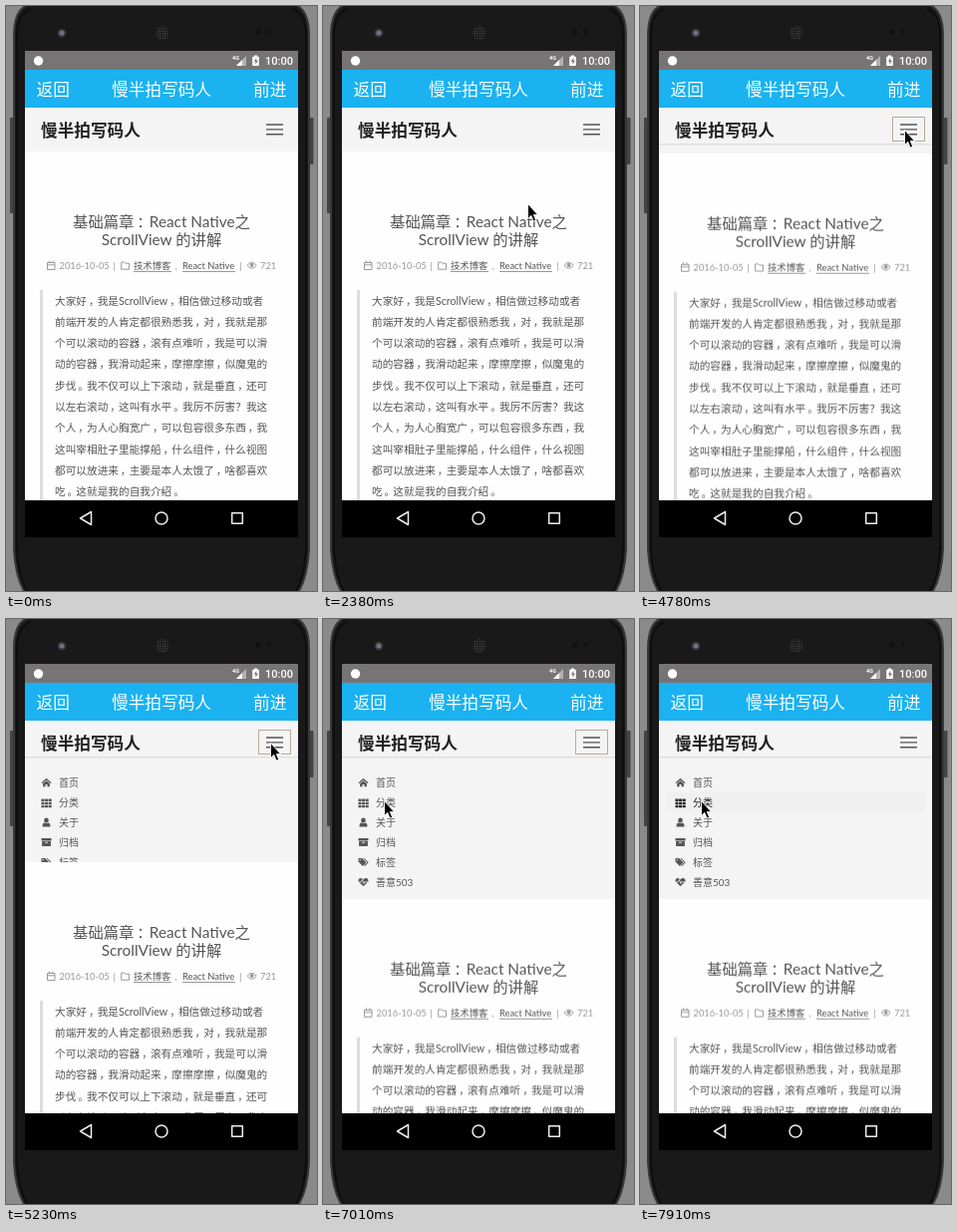
Write an HTML page that moves like this. It is 312 px wide and 587 px high and loops after 8000 ms.

```html
<!DOCTYPE html>
<html lang="zh-CN">
<head>
<meta charset="utf-8">
<title>ScrollView</title>
<style>
html, body { margin: 0; width: 100%; height: 100%; overflow: hidden; background: #8a8a8a; }
svg { display: block; }
text { font-family: Lato, "Noto Sans CJK SC", "Noto Sans CJK", "Noto Sans", sans-serif; white-space: pre; }
.ui { font-family: Roboto, "Noto Sans CJK SC", "Noto Sans CJK", sans-serif; }
.line { fill: none; stroke: #999; stroke-width: 1; }
</style>
</head>
<body>
<svg id="stage" width="312" height="587" viewBox="0 0 312 587">
  <defs>
    <clipPath id="web"><rect x="19" y="102" width="274" height="394"/></clipPath>
    <pattern id="mesh" width="2.4" height="2.4" patternUnits="userSpaceOnUse">
      <rect width="2.4" height="2.4" fill="#111"/><circle cx="1.2" cy="1.2" r=".75" fill="#555"/>
    </pattern>
  </defs>

  <!-- handset -->
  <rect width="312" height="587" fill="#8a8a8a"/>
  <rect x="4" y="112" width="4" height="96" rx="1" fill="#444"/>
  <rect x="305" y="112" width="3.5" height="47" rx="1" fill="#444"/>
  <path d="M24-3C13 2 8 11 8 30V545C9 565 13 580 20 590H292C299 580 303 565 304 545V30C304 11 299 2 288-3Z" fill="#191919" stroke="#383838" stroke-width="2"/>
  <path d="M24 3C15 7 11 15 11 31V544C12 564 16 580 23 590M288 3C297 7 301 15 301 31V544C300 564 296 580 289 590" fill="none" stroke="#0c0c0c" stroke-width="1.5"/>
  <circle cx="56" cy="27" r="4.5" fill="#333"/>
  <circle cx="56" cy="27" r="2.6" fill="#6d7284"/>
  <circle cx="157" cy="27" r="6.8" fill="url(#mesh)"/>
  <circle cx="253" cy="26" r="2.5" fill="#101010"/>
  <circle cx="264" cy="26" r="2" fill="#101010"/>

  <!-- status bar -->
  <rect x="19" y="45" width="274" height="19" fill="#767475"/>
  <circle cx="32.5" cy="55" r="4.7" fill="#fff"/>
  <path d="M241 50V60H231Z" fill="#fff" fill-opacity=".45"/>
  <path d="M237 54V60H231Z" fill="#fff"/>
  <path d="M249 49.5h3v1.3h1.8v9.2h-6.6v-9.2h1.8Z" fill="#fff"/>
  <path d="M251.3 51.8l-2.4 4h1.5v3l2.4-4h-1.5Z" fill="#767475"/>

  <!-- app bar -->
  <rect x="19" y="64" width="274" height="38" fill="#1ab2f0"/>

  <g clip-path="url(#web)">
    <rect x="19" y="102" width="274" height="394" fill="#f4f4f4"/>
    <rect id="row" x="26" y="174" width="260" height="20" fill="#f0f0f0" opacity="0"/>
    <g id="menu"></g>
    <g id="article">
      <rect x="19" y="146" width="274" height="360" fill="#fefefe"/>
      <rect x="34" y="285" width="3" height="260" fill="#ddd"/>
      <!-- calendar, folder, eye -->
      <path class="line" d="M41.5 257.5h7.5v7h-7.5ZM41.5 259.8h7.5M43.5 255.6v2.4M47 255.6v2.4"/>
      <path class="line" d="M115.7 257h3l1 1.2h3.8v6h-7.8Z"/>
      <path class="line" d="M242 260.3q4.6-6 9.2 0q-4.6 6-9.2 0Z"/>
      <circle cx="246.6" cy="260" r="1.9" fill="#999"/>
      <path class="line" d="M128 266.5h38M177 266.5h53"/>
    </g>
    <rect id="rule" x="19" y="138" width="274" height="1.3" fill="#ddd" opacity="0"/>
    <path d="M261 119h17M261 123.9h17M261 128.8h17" stroke="#555" stroke-width="1.4"/>
    <rect id="focus" x="253.5" y="111.5" width="32" height="24" fill="none" stroke="#b8ab9b" opacity="0"/>
  </g>

  <!-- navigation keys -->
  <rect x="19" y="496" width="274" height="37" fill="#000"/>
  <g fill="none" stroke="#eee" stroke-width="1.5" stroke-linejoin="round">
    <path d="M85.5 507.5V520.5L74.5 514Z"/>
    <circle cx="156" cy="514" r="6"/>
    <rect x="226.7" y="508.7" width="10.6" height="10.6"/>
  </g>

  <path id="cursor" d="M.5.5V15.5L3.8 12.4L6.2 18.2L8.7 17.1L6.3 11.5H10.6Z" fill="#000" stroke="#fff" stroke-width=".9" stroke-linejoin="round" opacity="0"/>
</svg>
<script>
const LOOP = 8000;
const NS = "http://www.w3.org/2000/svg";
const $ = id => document.getElementById(id);

function add(parent, tag, attrs, html = "") {
  const el = document.createElementNS(NS, tag);
  for (const key in attrs) el.setAttribute(key, attrs[key]);
  el.innerHTML = html;
  parent.append(el);
  return el;
}

// Full-width marks sit near the middle of their cell.
const centreMarks = s => s.replace(/([，。：])(.?)/g,
  '<tspan dx=".18em">$1</tspan><tspan dx="-.18em">$2</tspan>');

const label = (parent, x, y, size, fill, s, more) =>
  add(parent, "text", { x, y, "font-size": size, fill, ...more }, centreMarks(s));

const stage = $("stage"), article = $("article"), menu = $("menu");
const web = article.parentNode;
const SITE = "慢半拍写码人";
const ui = { class: "ui" };
const mid = { "text-anchor": "middle" };

function fixedText() {
  const top = add(stage, "g", {});
  label(top, 227, 54, 5.5, "#fff", "4G", { class: "ui", "font-weight": 700 });
  label(top, 260, 59, 11, "#fff", "10:00", { class: "ui", "font-weight": 500 });
  label(top, 30.5, 90, 16.67, "#fff", "返回", ui);
  label(top, 156, 90, 16.67, "#fff", SITE, { ...ui, ...mid });
  label(top, 248, 90, 16.67, "#fff", "前进", ui);
  label(web, 35, 130.5, 16.67, "#222", SITE, { "font-weight": 700 });
  stage.append($("cursor"));
}

function articleText() {
  label(article, 156, 222, 15.33, "#555", "基础篇章：React Native之", mid);
  label(article, 156, 240.4, 15.33, "#555", "ScrollView 的讲解", mid);
  [[53.5, "2016-10-05"], [107.5, "|"], [169.5, ","], [234.5, "|"], [255, "721"]]
    .forEach(([x, s]) => label(article, x, 263.6, 9.33, "#999", s));
  label(article, 128, 263.6, 9.33, "#555", "技术博客");
  label(article, 177, 263.6, 9.33, "#555", "React Native");
  [
    "大家好，我是ScrollView，相信做过移动或者",
    "前端开发的人肯定都很熟悉我，对，我就是那",
    "个可以滚动的容器，滚有点难听，我是可以滑",
    "动的容器，我滑动起来，摩擦摩擦，似魔鬼的",
    "步伐。我不仅可以上下滚动，就是垂直，还可",
    "以左右滚动，这叫有水平。我厉不厉害？我这",
    "个人，为人心胸宽广，可以包容很多东西，我",
    "这叫宰相肚子里能撑船，什么组件，什么视图",
    "都可以放进来，主要是本人太饿了，啥都喜欢",
    "吃。这就是我的自我介绍。"
  ].forEach((s, i) => label(article, 49, 299.5 + i * 21.33, 10.67, "#555", s));
}

// Icons are drawn around their own centre.
const items = [
  ["首页", "M-5 0L0-4.5L5 0L4 .8L0-2.8L-4 .8ZM-3.4 1L0-2L3.4 1V4H1V1.6H-1V4H-3.4Z"],
  ["分类", [-3.6, -.5, 2.6].map(y => [-5, -1.4, 2.2].map(x => `M${x} ${y}h3v2.4h-3Z`).join("")).join("")],
  ["关于", "M-2.3-2.2A2.3 2.3 0 0 1 2.3-2.2A2.3 2.6 0 0 1-2.3-2.2ZM-4 4.3Q-4 .3-2 .3Q0 1.6 2 .3Q4 .3 4 4.3Z"],
  ["归档", "M-5-4H5V-1.6H-5ZM-4.4-1H4.4V4H-4.4ZM-1.4-.2V.7H1.4V-.2Z"],
  ["标签", "M-5-4H-1.4L3 .4L-.6 4L-5-.4ZM-3.8-2.8V-1.7H-2.7V-2.8ZM0-4H1L5.2 .4L1.6 4L.8 3.3L3.9 .4Z"],
  ["善意503", "M0 4.5L-4.6 0C-6-2.2-3.4-5.6 0-2.4C3.4-5.6 6-2.2 4.6 0ZM-4.4 .4H-1.9L-1-1.6L.3 2.4L1.4 .4H4.4V-.3H1L.4 .8L-.9-3L-2.3-.3H-4.4Z"]
];

function menuRows() {
  return items.map(([name, icon], i) => {
    const g = add(menu, "g", { transform: `translate(40.5 ${164.3 + i * 19.9})`, fill: "#555" });
    add(g, "path", { d: icon, "fill-rule": "evenodd" });
    add(g, "text", { x: 12.5, y: 3.8, "font-size": 10 }, name);
    return g;
  });
}

// Plays [time, value] pairs as held steps.
function play(el, prop, steps) {
  const frames = steps.map(([t, v]) => ({ offset: t / LOOP, [prop]: v, easing: "step-end" }));
  frames.push({ ...frames[frames.length - 1], offset: 1 });
  el.animate(frames, { duration: LOOP, iterations: Infinity });
}

const trail = [
  [0, 259, 536],
  [900, 259, 536], [1050, 251, 430], [1200, 242, 320], [1350, 231, 215],
  [1500, 220, 137], [1650, 208, 152], [1790, 200, 182], [1940, 199, 202],
  [2090, 195, 208], [2240, 200, 205], [2380, 205, 198], [2530, 217, 180],
  [2680, 237, 156], [2830, 254, 138], [2980, 266, 129], [3130, 265, 126],
  [3280, 265, 124],
  [5830, 236, 142], [5980, 158, 172], [6130, 87, 191], [6280, 68, 202],
  [6430, 62, 200], [6570, 60, 197], [6720, 62, 194], [6860, 64, 190],
  [7010, 61, 182]
];

articleText();
const rows = menuRows();
fixedText();

play($("cursor"), "transform", trail.map(([t, x, y]) => [t, `translate(${x}px, ${y}px)`]));
play($("cursor"), "opacity", [[0, 0], [900, 1]]);
play(article, "transform", [[0, 0], [4780, 1.7], [5230, 98], [5380, 134.7]].map(([t, y]) => [t, `translate(0px, ${y}px)`]));
play($("rule"), "opacity", [[0, 0], [4780, 1]]);
play($("focus"), "opacity", [[0, 0], [4780, 1], [7610, 0]]);
play($("row"), "opacity", [[0, 0], [7610, .4], [7760, .8], [7910, 1]]);
play(rows[1], "fill", [[0, "#555"], [7610, "#444"], [7760, "#333"], [7910, "#222"]]);
</script>
</body>
</html>
```
